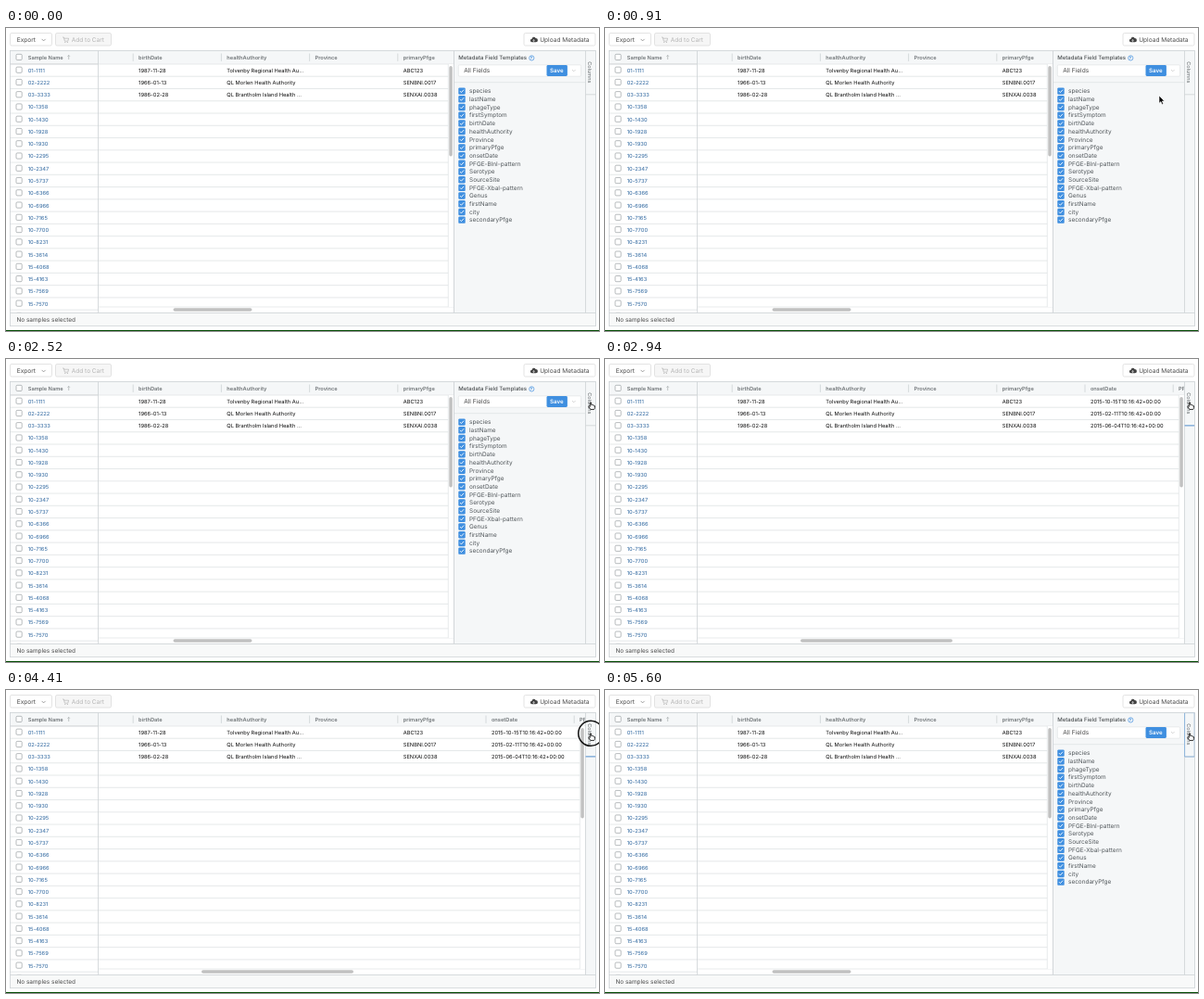
An HTML page for the animation above (5.74 s loop, 640 px wide and 327 px high).

```html
<!DOCTYPE html>
<html lang="en">
<head>
<meta charset="utf-8">
<title>Sample table with column panel</title>
<style>
html, body { margin: 0; width: 100%; height: 100%; overflow: hidden; background: #fff; }
svg { display: block; width: 100vw; height: 100vh; }
text {
  font-family: Inter, Roboto, sans-serif; font-feature-settings: "calt" 0;
  text-rendering: geometricPrecision; white-space: pre;
}
</style>
</head>
<body>
<svg id="stage" viewBox="0 0 640 327"></svg>
<script>
const NS = 'http://www.w3.org/2000/svg';
const LOOP = 5740, STEP = 70;
const stage = document.getElementById('stage');

function add(parent, tag, attrs = {}) {
  const el = document.createElementNS(NS, tag);
  for (const k in attrs) el.setAttribute(k, attrs[k]);
  parent.appendChild(el);
  return el;
}
const group = (parent, attrs) => add(parent, 'g', attrs);
const rect = (p, x, y, width, height, fill, more) =>
  add(p, 'rect', { x, y, width, height, fill, ...more });
const path = (p, d, stroke, width = 1, more) =>
  add(p, 'path', { d, fill: 'none', stroke, 'stroke-width': width, ...more });
// y is the middle of the line
function label(p, x, y, str, size, fill, weight = 400) {
  add(p, 'text', { x, y: y + size * 0.36, 'font-size': size, 'font-weight': weight, fill }).textContent = str;
}
const show = (el, on) => el.setAttribute('visibility', on ? 'visible' : 'hidden');

const INK = '#0c0c0c', HEAD = '#6f7477', LINE = '#dfe2e4', EDGE = '#cdd2d5';
const BLUE = '#3f8fe0', FOCUS = '#8db4dc', PALE = '#f5f7f8';
const ROW0 = 45.6, ROW = 13.26;

rect(stage, 0, 0, 640, 327, '#fff');
const defs = add(stage, 'defs');
const clip = (id, x, y, w, h) => rect(add(defs, 'clipPath', { id }), x, y, w, h, '#000');
clip('pinned', 4, 24, 96, 283.5);
const cellClip = clip('cells', 100, 24, 383.5, 283.5);

// Toolbar
function button(x, w, fill = '#fff') {
  rect(stage, x + 0.5, 5.5, w, 13.5, fill, { rx: 1.6, stroke: '#dcdcdc', 'stroke-width': 0.8 });
}
button(4, 45);
label(stage, 11.7, 12.8, 'Export', 6.6, '#4a4a4a');
path(stage, 'M38.6 11.9l2 2 2-2', '#777', 0.7);
button(53, 60, '#f6f6f6');
label(stage, 70.8, 12.8, 'Add to Cart', 6.5, '#b5b5b5');
path(stage, 'M61 10h1.4l1 4.2h3.4l.8-3h-4.7', '#b5b5b5', 0.7);
for (const x of [63.8, 66.4]) add(stage, 'circle', { cx: x, cy: 15.5, r: 0.6, fill: '#b5b5b5' });
button(558.5, 77);
path(stage, 'M567.7 15.3a1.8 1.8 0 0 1-.1-3.6a2.1 2.1 0 0 1 4-.8a1.8 1.8 0 0 1 .3 4.4z', 'none', 0, { fill: '#444' });
path(stage, 'M569.6 15v-2.4m-1 1l1-1 1 1', '#fff', 0.6);
label(stage, 576.2, 12.8, 'Upload Metadata', 6.58, '#4a4a4a');

// Table
const head = rect(stage, 4.5, 24.5, 479, 14.3, PALE);
const cells = group(stage, { 'clip-path': 'url(#cells)' });
const pinned = group(stage, { 'clip-path': 'url(#pinned)' });

function checkBox(x, y) {
  rect(pinned, x, y - 3.5, 6.2, 6.2, '#fff', { rx: 1.1, stroke: '#999ea1', 'stroke-width': 0.7 });
}
checkBox(11, 31.8);
label(pinned, 23.7, 31.7, 'Sample Name', 5.7, HEAD, 600);
path(pinned, 'M67.7 34v-4.6m-1.2 1.3l1.2-1.3 1.2 1.3', '#9a9fa2', 0.6);

const ids = ('01-1111 02-2222 03-3333 10-1358 10-1430 10-1928 10-1930 10-2295 10-2347 10-5737 10-6366 ' +
  '10-6966 10-7165 10-7700 10-8231 15-3614 15-4068 15-4163 15-7569 15-7570').split(' ');
for (let i = 0; i <= ids.length; i++) {
  const y = ROW0 + i * ROW, edge = `M0 ${y - ROW / 2}H640`;
  path(pinned, edge, LINE, 0.8);
  path(cells, edge, LINE, 0.8);
  checkBox(11, y);
  if (ids[i]) label(pinned, 23.7, y, ids[i], 5.7, '#4678aa', 500);
}

const columns = [
  ['birthDate', '1987-11-28', '1966-01-13', '1986-02-28'],
  ['healthAuthority', 'Tolvenby Regional Health Au...', 'QL Morlen Health Authority', 'QL Brantholm Island Health ...'],
  ['Province'],
  ['primaryPfge', 'ABC123', 'SENBNI.0017', 'SENXAI.0038'],
  ['onsetDate', '2015-10-15T10:16:42+00:00', '2015-02-11T10:16:42+00:00', '2015-06-04T10:16:42+00:00'],
  ['PFGE-BlnI-pattern']
];
columns.forEach(([name, ...values], i) => {
  const x = 143.1 + i * 95.2;
  path(cells, `M${x - 5.9} 27.5v8.4`, EDGE, 0.8);
  label(cells, x, 31.7, name, 5.7, HEAD, 600);
  values.forEach((v, r) => label(cells, x, ROW0 + r * ROW, v, 5.75, INK));
});

// Scroll bars: gutters, then thumbs
rect(cells, 100, 301, 540, 7, '#fff');
path(cells, 'M100 301H640', LINE, 0.7);
const gutter = group(cells);
rect(gutter, 0, 39.1, 6.5, 262, '#fff');
path(gutter, 'M0 39V301', LINE, 0.7);
path(stage, 'M99.5 24.5V307.5', EDGE, 0.8);
const thumbX = rect(stage, 180.5, 302.2, 85, 3.6, '#c1c1c1', { rx: 1.8 });
const thumbY = rect(stage, 478, 41, 3.5, 97.5, '#c1c1c1', { rx: 1.75 });

// Column panel
const panel = group(stage);
rect(panel, 483.5, 24.5, 142, 283, PALE);
path(panel, 'M483.5 24.5V307.5', EDGE, 0.9);
label(panel, 488.3, 32.2, 'Metadata Field Templates', 6, '#4a4e50', 500);
add(panel, 'circle', { cx: 567.3, cy: 32.4, r: 2.6, fill: 'none', stroke: BLUE, 'stroke-width': 0.7 });
label(panel, 565.8, 32.5, '?', 4.6, BLUE, 600);
rect(panel, 488.3, 39.8, 132.3, 12.4, '#fff', { rx: 1.4, stroke: '#e0e3e4', 'stroke-width': 0.7 });
label(panel, 494.2, 45.9, 'All Fields', 6.6, '#4a4a4a');
rect(panel, 583.5, 40.1, 22.4, 11.8, BLUE, { rx: 1.4 });
label(panel, 587, 46, 'Save', 6.2, '#fff', 600);
path(panel, 'M611 45l1.8 1.8 1.8-1.8', '#c4c4c4', 0.7);
path(panel, 'M484 58.7H625', LINE, 0.8);
('species lastName phageType firstSymptom birthDate healthAuthority Province primaryPfge onsetDate ' +
  'PFGE-BlnI-pattern Serotype SourceSite PFGE-XbaI-pattern Genus firstName city secondaryPfge')
  .split(' ').forEach((name, i) => {
    const y = 68.1 + i * 8.69;
    rect(panel, 488.3, y - 3.7, 7.4, 7.4, BLUE, { rx: 1.2 });
    path(panel, `M490 ${y}l1.4 1.5 2.7-3`, '#fff', 0.9);
    label(panel, 500, y, name, 6.45, '#50565a');
  });

// Tab strip, footer and frame
rect(stage, 625.5, 24.5, 11, 283, PALE);
path(stage, 'M625.5 24.5V307.5', EDGE, 0.8);
const tabEdge = path(stage, 'M625.5 71.8H636.5', EDGE, 0.8);
label(group(stage, { transform: 'translate(630.4 36.2) rotate(90)' }), 0, 0, 'Columns', 5.6, '#666b6e');
const tabFocus = path(stage, 'M625.6 24.6H636.2V72H625.6z', FOCUS, 1);
rect(stage, 4.5, 307.5, 632, 14.2, '#f8f9f9');
path(stage, 'M4.5 307.5H636.5', EDGE, 0.8);
path(stage, 'M4.5 38.9H99.5', EDGE, 0.8);
rect(stage, 4.5, 24.5, 632, 297.2, 'none', { stroke: EDGE, 'stroke-width': 0.8 });
label(stage, 11.4, 315, 'No samples selected', 6.45, '#4a4a4a');
rect(stage, 0, 326, 640, 1, '#064d06');

// Pointer
const ring = add(stage, 'circle', { cx: 631.2, cy: 46.8, r: 13.5, fill: 'none', stroke: '#111', 'stroke-width': 1.5 });
const arrow = path(stage, 'M0 0V8.2L1.9 6.5L3.2 9.4L4.6 8.8L3.3 5.9H5.8z', '#fff', 0.6, { fill: '#000' });
const hand = path(stage,
  'M-.7 4V.2Q0-.6.7.2V2.8Q1.5 2.3 2 3Q2.9 2.6 3.3 3.3Q4.3 3.1 4.5 4V5.6Q4.4 6.8 3.7 7.6H-.1Q-1.2 6.3-2.3 4.7Q-2 3.6-.7 4.6z',
  '#111', 0.9, { fill: '#fff', 'stroke-linejoin': 'round' });

// time, x, y
const route = [
  [350, 558, 128], [630, 592, 82], [770, 598, 73], [910, 598, 73], [1260, 622, 50],
  [1400, 621, 47], [1470, 621, 47], [1680, 628, 48], [1750, 628, 48], [2100, 631, 46.8]
];
function pointerAt(t) {
  const n = route.findIndex(k => k[0] > t);
  if (n < 0) return route[route.length - 1].slice(1);
  if (n === 0) return route[0].slice(1);
  const [a, b] = [route[n - 1], route[n]];
  let f = (t - a[0]) / (b[0] - a[0]);
  f = f * f * (3 - 2 * f);
  return [1, 2].map(i => a[i] + (b[i] - a[i]) * f);
}
const within = (t, from, to) => t >= from && t < to;

function draw(now) {
  const t = Math.floor((now % LOOP) / STEP) * STEP;
  const wide = within(t, 2870, 4690);
  const right = wide ? 625.5 : 483.5;
  show(panel, !wide);
  head.setAttribute('width', right - 4.5);
  cellClip.setAttribute('width', right - 100);
  gutter.setAttribute('transform', `translate(${right - 6.2} 0)`);
  thumbX.setAttribute('x', wide ? 211 : 180.5);
  thumbX.setAttribute('width', wide ? 164 : 85);
  thumbY.setAttribute('x', right - 5.2);
  tabEdge.setAttribute('stroke', wide ? FOCUS : EDGE);
  tabEdge.setAttribute('stroke-width', wide ? 1.6 : 0.8);
  show(tabFocus, t >= 4690);

  const move = `translate(${pointerAt(t).join(' ')})`;
  arrow.setAttribute('transform', move);
  hand.setAttribute('transform', move);
  show(arrow, within(t, 350, 1820));
  show(hand, t >= 1820);
  show(ring, within(t, 2590, 2730) || within(t, 4410, 4550));
}

let start;
function tick(now) {
  start ??= now;
  draw(now - start);
  requestAnimationFrame(tick);
}
draw(0);
requestAnimationFrame(tick);
</script>
</body>
</html>
```
